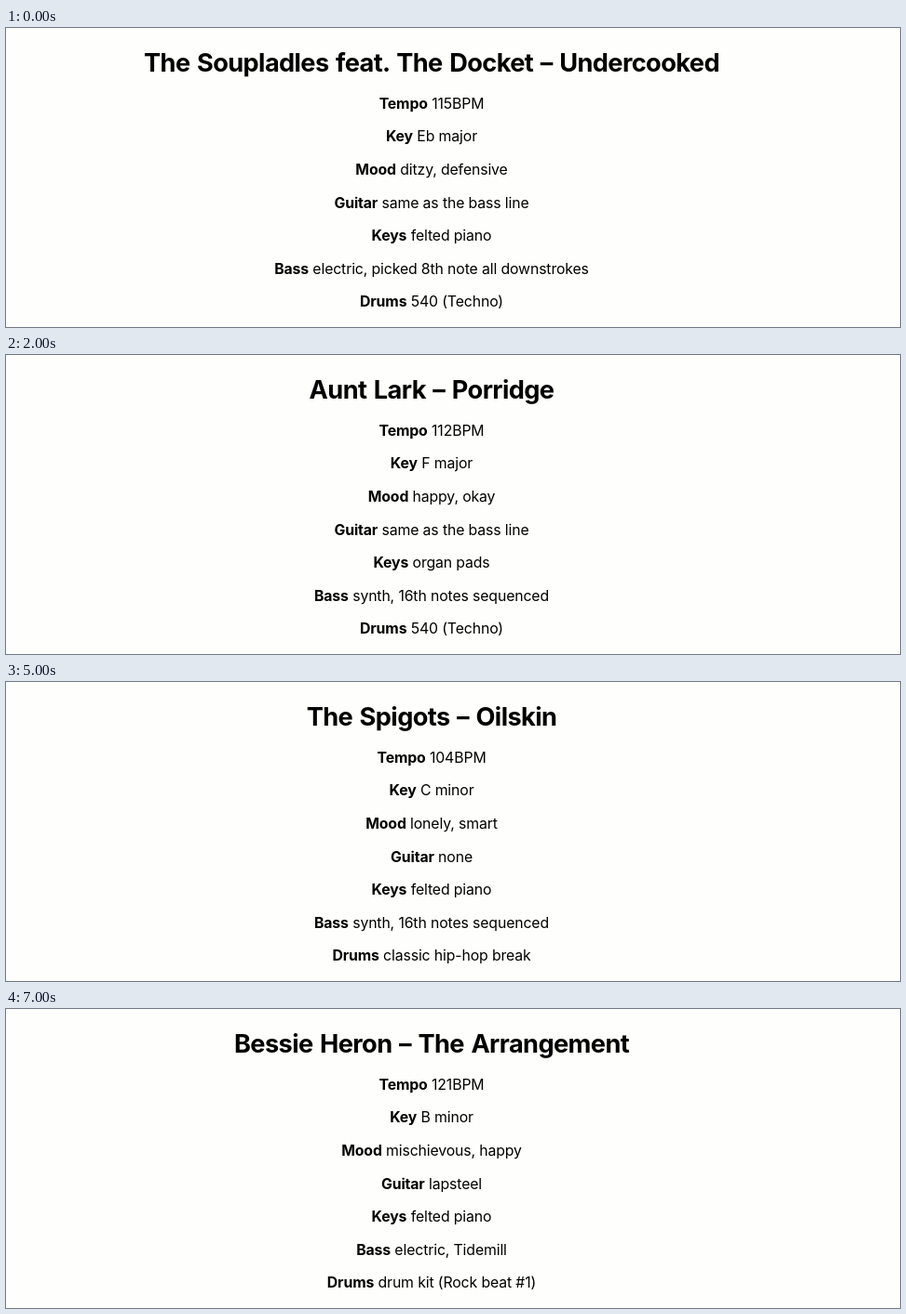
Recreate the animation shown at these times as an HTML page. Size 960 px wide and 322 px high, loop 8 s.

```html
<!DOCTYPE html>
<html lang="en">
<head>
<meta charset="utf-8">
<title>Song cards</title>
<style>
  html, body { margin: 0; width: 100%; height: 100%; overflow: hidden; background: #fefefc; }
  svg { display: block; width: 100%; height: 100%; }
  text {
    font-family: Inter, "Liberation Sans", sans-serif;
    font-optical-sizing: none;
    font-size: 15.8px;
    letter-spacing: -0.0075em;
    text-anchor: middle;
    fill: #000;
  }
  .title { font-size: 27.2px; letter-spacing: -0.022em; word-spacing: 0.06em; }
  .title, .label { font-weight: 700; }
</style>
</head>
<body>
<svg viewBox="0 0 960 322" id="stage"></svg>
<script>
const STEP = 1000;
const CENTER = 457;
const FIRST_ROW = 86.7;
const ROW_GAP = 35.6;
const labels = ["Tempo", "Key", "Mood", "Guitar", "Keys", "Bass", "Drums"];

const bassLine = "same as the bass line";
const longChords = "piano (long chords)";
const longNotes = "electric, long notes, change when the chord does";
const sequenced = "synth, 16th notes sequenced";
const hallKit = "drum kit (Out the Hall-ish)";

// Title, then one value per label.
const songs = [
  ["The Soupladles feat. The Docket – Undercooked", "115BPM", "Eb major", "ditzy, defensive",
    bassLine, "felted piano", "electric, picked 8th note all downstrokes", "540 (Techno)"],
  ["The Gaskets – The Flannel", "116BPM", "A minor", "nerdy, smart",
    "none", longChords, longNotes, hallKit],
  ["Aunt Lark – Porridge", "112BPM", "F major", "happy, okay",
    bassLine, "organ pads", sequenced, "540 (Techno)"],
  ["Miss Carp – The Thimble", "67BPM", "Eb minor", "defensive, lonely",
    "none", longChords, sequenced, hallKit],
  ["Edgar Bittern – Recalculate", "117BPM", "Db major", "okay, confused",
    "electric: slacker strumming", "organ pads", "electric, picked, Mending Room-esque", "classic hip-hop break"],
  ["The Spigots – Oilskin", "104BPM", "C minor", "lonely, smart",
    "none", "felted piano", sequenced, "classic hip-hop break"],
  ["Mr. Fork – Tobin", "108BPM", "Gb major", "giggly, shocked",
    bassLine, "piano (ravey)", longNotes, "just claps"],
  ["Bessie Heron – The Arrangement", "121BPM", "B minor", "mischievous, happy",
    "lapsteel", "felted piano", "electric, Tidemill", "drum kit (Rock beat #1)"]
];

function add(parent, tag, attrs = {}, content = "") {
  const node = document.createElementNS("http://www.w3.org/2000/svg", tag);
  for (const key in attrs) node.setAttribute(key, attrs[key]);
  node.textContent = content;
  parent.appendChild(node);
  return node;
}

const stage = document.getElementById("stage");
const fields = [add(stage, "text", { class: "title", x: CENTER, y: 47 })];
labels.forEach((label, i) => {
  const row = add(stage, "text", { x: CENTER, y: FIRST_ROW + i * ROW_GAP });
  add(row, "tspan", { class: "label" }, label);
  row.append(" ");
  fields.push(add(row, "tspan"));
});

let shown = -1;
function render(time) {
  const index = Math.floor(time / STEP) % songs.length;
  if (index === shown) return;
  shown = index;
  fields.forEach((field, i) => { field.textContent = songs[index][i]; });
}

let start;
function tick(now) {
  start ??= now;
  render(Math.max(0, now - start));
  requestAnimationFrame(tick);
}
render(0);
requestAnimationFrame(tick);
</script>
</body>
</html>
```
